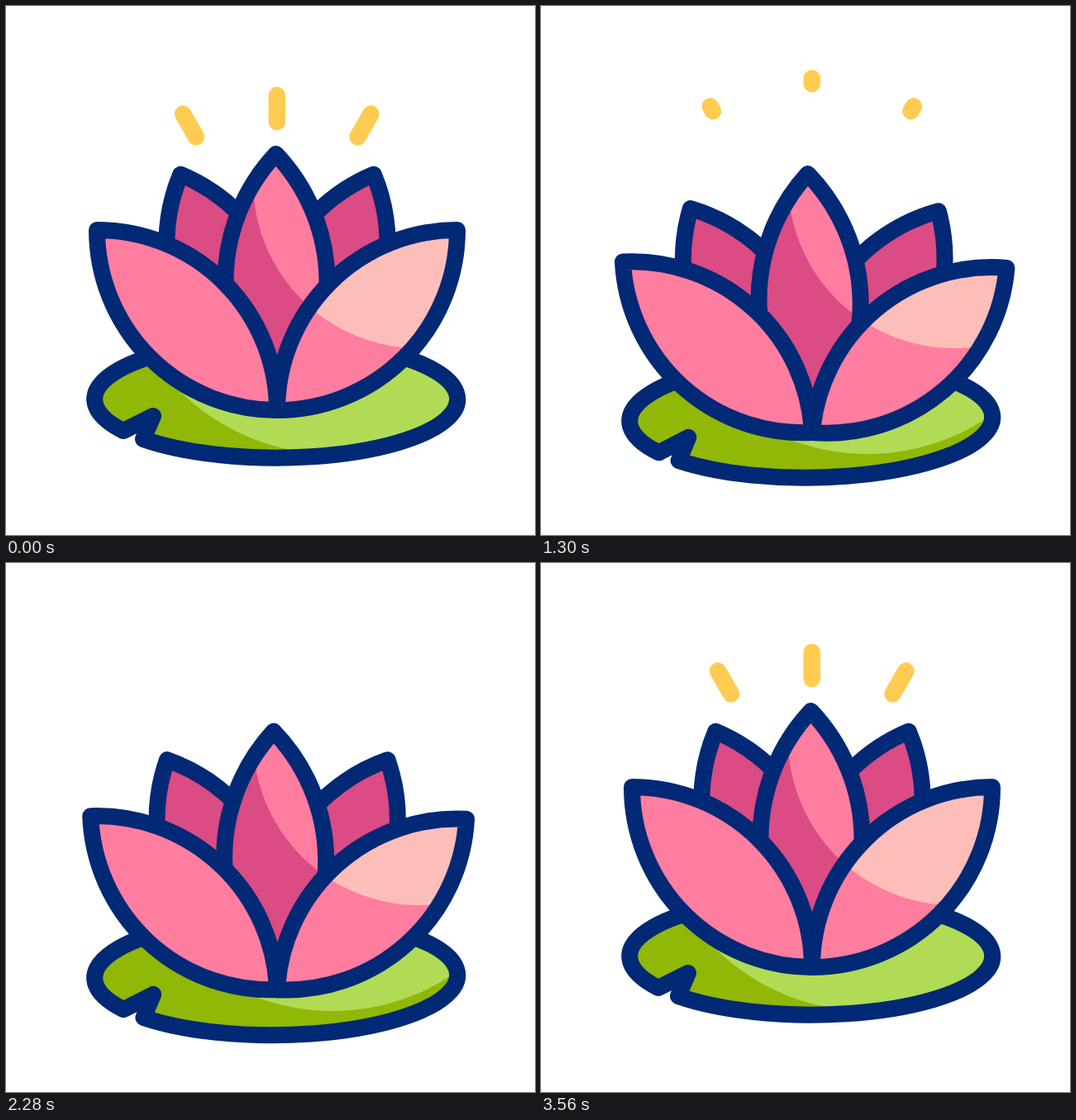
These frames come from a looping animation (640x640 px, 3600 ms). An HTML page:

```html
<!DOCTYPE html>
<html lang="en">
<head>
<meta charset="utf-8">
<title>Water lily</title>
<style>
html, body { margin: 0; width: 100%; height: 100%; overflow: hidden; background: #fff; }
svg { display: block; width: 100vw; height: 100vh; }
.line { fill: none; stroke: #022975; stroke-width: 20; stroke-linejoin: round; }
#sparks { stroke: #ffcb50; stroke-width: 20.5; stroke-linecap: round; }
</style>
</head>
<body>
<svg id="stage" viewBox="0 0 640 640"></svg>
<script>
const LOOP = 3600;
const BASE = [328, 489];
const stage = document.getElementById('stage');

function add(parent, tag, attrs) {
  const el = document.createElementNS('http://www.w3.org/2000/svg', tag);
  for (const k in attrs) el.setAttribute(k, attrs[k]);
  parent.appendChild(el);
  return el;
}

// Smooth curve through [time, value] points without overshoot.
function curve(pts) {
  const n = pts.length;
  const slope = i => (pts[i + 1][1] - pts[i][1]) / (pts[i + 1][0] - pts[i][0]);
  const tan = pts.map((_, i) => {
    if (i === 0 || i === n - 1) return 0;
    const a = slope(i - 1), b = slope(i);
    return a * b <= 0 ? 0 : 2 * a * b / (a + b);
  });
  return t => {
    if (t <= pts[0][0]) return pts[0][1];
    if (t >= pts[n - 1][0]) return pts[n - 1][1];
    let i = 0;
    while (t > pts[i + 1][0]) i++;
    const h = pts[i + 1][0] - pts[i][0], u = (t - pts[i][0]) / h, v = 1 - u;
    return v * v * ((1 + 2 * u) * pts[i][1] + u * h * tan[i])
         + u * u * ((3 - 2 * u) * pts[i + 1][1] - v * h * tan[i + 1]);
  };
}

const swingTimes = [120, 620, 820, 1130, 1300, 1640, 1880, 2150, 2280, 2660, 2900, 3250];
const swing = (...deg) => curve(deg.map((d, i) => [swingTimes[i], d]));

const sink = curve([[100, 0], [260, 1.3], [640, 6.8], [820, 11], [1300, 24], [1720, 36.6], [1800, 38]]);
const tilt = curve([[120, 0], [820, 1.2], [1300, 0.7], [1880, 0.9], [2280, 0.5], [2900, 0]]);

// Degrees by which each petal closes towards the middle.
const close = {
  backLeft: swing(0, 13, 8.4, -12, -5.6, 10, 4.95, -5.8, -2.85, 4, 1.65, 0),
  backRight: swing(0, 13, 8.5, -13.5, -8.2, 9, 4.75, -6.2, -3.95, 4.4, 2.15, 0),
  left: swing(0, 6, 3.2, -7.3, -2.3, 5, 1.3, -3.7, -1.6, 2.2, 0.8, 0),
  right: swing(0, 6, 3.3, -8.3, -5.5, 4, 1, -4.7, -3.5, 2.3, 1.1, 0)
};

const defs = add(stage, 'defs', {});
let count = 0;

// A filled outline whose lit part is a circle fixed to the stage.
function shape(d, fill, lit, light) {
  const parts = [];
  parts.push(add(stage, 'path', { d, fill }));
  if (lit) {
    const id = 'clip' + count++;
    parts.push(add(add(defs, 'clipPath', { id }), 'path', { d }));
    const g = add(stage, 'g', { 'clip-path': `url(#${id})` });
    add(g, 'circle', { cx: light[0], cy: light[1], r: light[2], fill: lit });
  }
  parts.push(add(stage, 'path', { d, class: 'line' }));
  return transform => parts.forEach(p => p.setAttribute('transform', transform));
}

const PINK_LIGHT = [500, 213, 201], GREEN_LIGHT = [395, 280, 262];
const petal = 'M0 0A218 218 0 0 1 218 -218A218 218 0 0 1 0 0Z';
const middle = 'M-.5 0A226 226 0 0 1 -1.5 -310A226 226 0 0 1 -.5 0Z';
const leaf = 'M166 524A219.5 71 0 1 0 142 514L178 496Z';

const pad = shape(leaf, '#91b707', '#b1db54', GREEN_LIGHT);
const backLeft = shape(petal, '#db4b84');
const backRight = shape(petal, '#db4b84');
const centre = shape(middle, '#db4b84', '#ff7d9f', PINK_LIGHT);
const left = shape(petal, '#ff7d9f');
const right = shape(petal, '#ff7d9f', '#fdbeb9', PINK_LIGHT);

const sparks = add(stage, 'g', { id: 'sparks' });
const rays = [0, 1, 2].map(() => add(sparks, 'line', {}));

const mix = (a, b, u) => a + (b - a) * u;
const clamp = x => Math.max(0, Math.min(1, x));

function setRay(el, x, y, dx, dy, len) {
  const h = Math.max(len, 0.02) / 2;
  el.setAttribute('x1', x - dx * h);
  el.setAttribute('y1', y - dy * h);
  el.setAttribute('x2', x + dx * h);
  el.setAttribute('y2', y + dy * h);
}

function drawSparks(t) {
  const FULL = 310, END = 545;
  const rest = t < 325 || t >= 3485;
  const p = rest ? FULL : (t - 15) % 790;
  const grow = clamp(p / FULL), leave = clamp((p - FULL) / (END - FULL));
  const path = (a, b, c) => p < FULL ? mix(a, b, grow) : mix(b, c, leave);
  const len = path(0, 32, 0);
  const x = path(91.5, 105.75, 125.5), y = path(165, 144.5, 119);
  setRay(rays[0], 327.75 - x, y, -0.5, -0.866, len);
  setRay(rays[1], 327.75, path(148, 124, 82), 0, -1, len);
  setRay(rays[2], 327.75 + x, y, 0.5, -0.866, len);
  sparks.setAttribute('opacity', clamp(p / 75) * clamp((570 - p) / 65));
}

function draw(t) {
  const d = sink(Math.min(t, LOOP - t)), lean = tilt(t);
  const a = {};
  for (const k in close) a[k] = close[k](t);
  const drop = 0.08 * d - 0.125 * (a.left + a.right);

  pad(`translate(0 ${d}) rotate(${-lean} 328 476)`);
  const root = extra => `translate(${BASE[0]} ${BASE[1] + d + extra}) rotate(${-lean})`;
  const place = (flip, deg) => `${root(drop)} scale(${flip} 1) rotate(${-deg})`;
  backLeft(place(-1, 22.75 + a.backLeft));
  backRight(place(1, 22.75 + a.backRight));
  centre(root(0));
  left(place(-1, a.left));
  right(place(1, a.right));
  drawSparks(t);
}

const start = performance.now();
function tick() {
  draw((performance.now() - start) % LOOP);
  requestAnimationFrame(tick);
}
tick();
</script>
</body>
</html>
```
